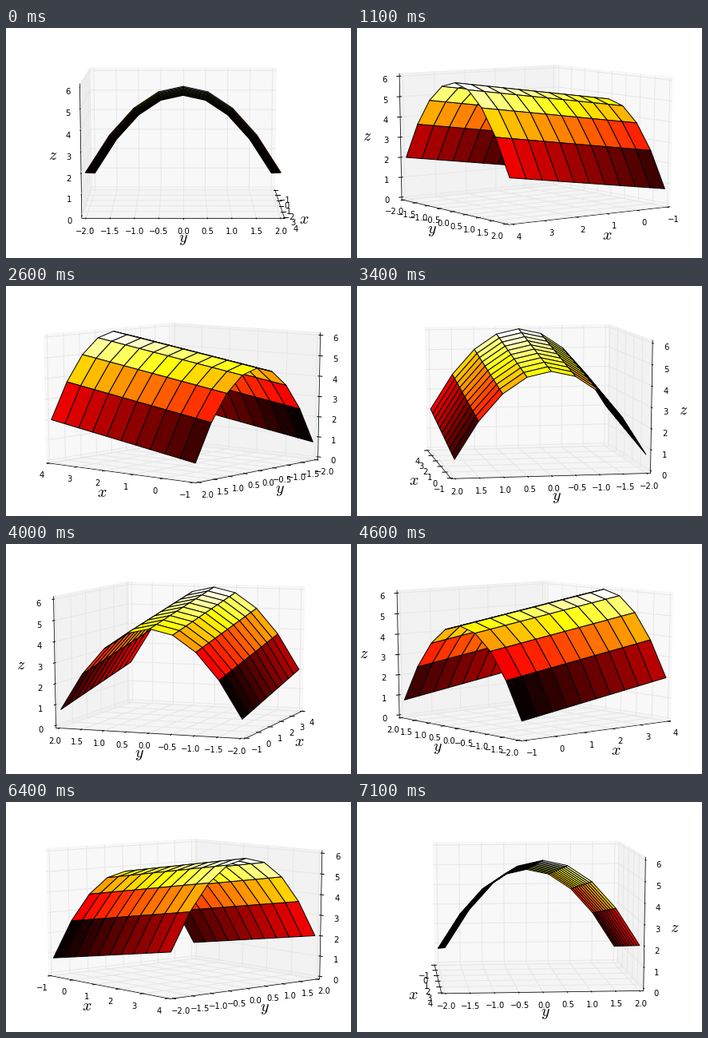
Animation of 432x288 px, one loop 7200 ms. Source, as a matplotlib script:

```python
import numpy as np
import matplotlib.pyplot as plt
from matplotlib.animation import FuncAnimation
from matplotlib.collections import LineCollection, PolyCollection
from matplotlib.patches import Polygon

plt.rcParams.update({"font.family": "DejaVu Sans", "font.size": 10,
                     "mathtext.fontset": "cm"})

FRAMES, INTERVAL = 72, 100
ELEV, DIST = np.radians(10), 10
UNIT = 1 / 12                # base length for ticks and label gaps
HALF = 0.5 + UNIT / 4        # half the width of the drawn box

# Axis name, limits, tick values, tick format, tick direction, pane grey
AXES = [
    ("$x$", (-1, 4), np.arange(-1, 5), "{:.0f}", 1, 0.95),
    ("$y$", (-2, 2), np.arange(-2, 2.5, 0.5), "{:.1f}", 0, 0.90),
    ("$z$", (0, 6), np.arange(0, 7), "{:.0f}", 0, 0.925),
]


def to_cube(values, limits):
    """Scale data so that the limits become -0.5 and 0.5."""
    low, high = limits
    return (values - low) / (high - low) - 0.5


def build_surface():
    """Return the mesh cells in cube space and their colours."""
    x, y = np.meshgrid(np.linspace(-1, 4, 11), np.linspace(-2, 2, 9))
    z = 5 + x / 4 - y**2
    grid = np.stack([to_cube(v, a[1]) for v, a in zip((x, y, z), AXES)], -1)
    first = grid[:-1, :-1]
    ring = [first, grid[:-1, 1:], grid[1:, 1:], grid[1:, :-1], first]
    cells = np.stack(ring, 2).reshape(-1, 5, 3)
    level = cells[..., 2].mean(axis=1)
    return cells, plt.cm.hot(plt.Normalize(level.min(), level.max())(level))


class Camera:
    def __init__(self, azim):
        ca, sa, ce, se = np.cos(azim), np.sin(azim), np.cos(ELEV), np.sin(ELEV)
        self.toward = np.array([ce * ca, ce * sa, se])
        self.right = np.array([-sa, ca, 0])
        self.up = np.cross(self.toward, self.right)

    def depth(self, points):
        return DIST - np.asarray(points) @ self.toward

    def project(self, points):
        flat = np.asarray(points) @ np.stack([self.right, self.up], -1)
        return flat / self.depth(points)[..., None]


fig = plt.figure(figsize=(6, 4), dpi=72, facecolor="white")
ax = fig.add_axes([0, 0, 1, 1])
cells, colors = build_surface()


def line(points, width):
    ax.plot(*points.T, color="black", lw=width, zorder=1)


def replaced(point, index, value):
    point = point.copy()
    point[index] = value
    return point


def pushed_out(edge, index, factor, value):
    """Move a point of an edge away from the box, sideways to its axis."""
    return replaced(edge + np.sign(edge) * factor * UNIT, index, value)


def draw_pane(cam, far, index, grey):
    j, k = [n for n in range(3) if n != index]
    corners = []
    for sj, sk in ((-1, -1), (1, -1), (1, 1), (-1, 1)):
        corner = far.copy()
        corner[j], corner[k] = sj * HALF, sk * HALF
        corners.append(corner)
    ax.add_patch(Polygon(cam.project(corners), closed=False, fc=[grey] * 3,
                         ec=[grey] * 3, alpha=0.5, lw=1, zorder=1))


def draw_axis(cam, far, index):
    name, limits, ticks, fmt, side, _ = AXES[index]
    spots = to_cube(ticks, limits)
    edge = replaced(far, side, -far[side])
    line(cam.project([edge, replaced(edge, index, -edge[index])]), 0.75)

    ax.text(*cam.project(pushed_out(edge, index, 1.6, 0)), name, size=20,
            ha="center", va="center", zorder=1)

    grid = []
    for spot in spots:
        mid = replaced(far, index, spot)
        ends = [replaced(mid, n, -mid[n])
                for n in ((index + 1) % 3, (index + 2) % 3)]
        grid.append(cam.project([ends[0], mid, ends[1]]))
    ax.add_collection(LineCollection(grid, colors="0.9", linewidths=1,
                                     zorder=1), autolim=False)

    sign = np.sign(edge[side])
    for tick, spot in zip(ticks, spots):
        base = replaced(edge, index, spot)
        line(cam.project([replaced(base, side, base[side] + sign * f * UNIT)
                          for f in (-0.1, 0.2)]), 1)
        ax.text(*cam.project(pushed_out(edge, index, 0.7, spot)),
                fmt.format(tick).replace("-", "\u2212"), size=10,
                ha="center", va="top", zorder=1)


def draw_surface(cam):
    order = np.argsort((1 / cam.depth(cells)).mean(axis=1), kind="stable")
    ax.add_collection(PolyCollection(cam.project(cells[order]),
                                     facecolors=colors[order],
                                     edgecolors="black", linewidths=1,
                                     zorder=2), autolim=False)


def draw(frame):
    ax.clear()
    ax.set_axis_off()
    ax.set(xlim=(-0.95 / DIST, 0.9 / DIST), ylim=(-0.95 / DIST, 0.9 / DIST))
    cam = Camera(2 * np.pi * frame / FRAMES)
    far = np.where(cam.toward < -1e-9, HALF, -HALF)
    for index in range(3):
        draw_pane(cam, far, index, AXES[index][-1])
    for index in range(3):
        draw_axis(cam, far, index)
    draw_surface(cam)
    return []


anim = FuncAnimation(fig, draw, frames=FRAMES, interval=INTERVAL,
                     init_func=lambda: draw(0), repeat=True, repeat_delay=0)
plt.show()
```
